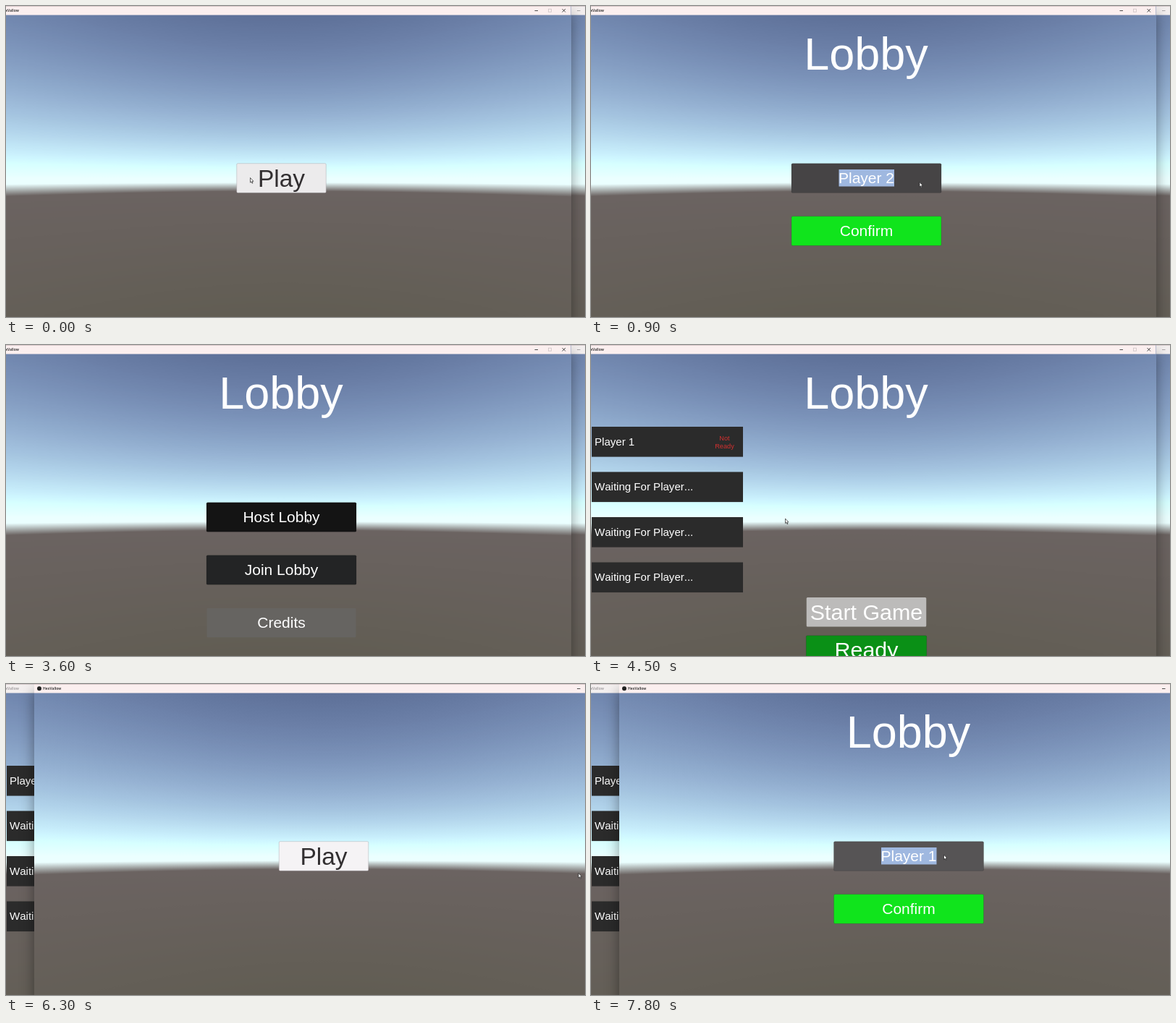
Animation of 800x430 px, one loop 8000 ms. Source, as an HTML page with a canvas:

```html
<!DOCTYPE html>
<html lang="en">
<head>
<meta charset="utf-8">
<style>
html, body { margin: 0; width: 100%; height: 100%; overflow: hidden; background: #615d53; }
canvas { display: block; }
</style>
</head>
<body>
<canvas id="stage" width="800" height="430"></canvas>
<script>
const ctx = document.getElementById('stage').getContext('2d');
const LOOP = 8000, STEP = 100, MOVE = 300;
const MID = 400, HORIZON = 238, FOCAL = 390, REACH = 225, BAR = 12.5;
const LEFT_WIN = -19.5, RIGHT_WIN = 39;
const SANS = '"Liberation Sans", Arial, sans-serif';
const GREEN = '#10e41c', DARK = '#232425', CLEAR = 'transparent';
const ARROW = new Path2D('M0 0V6.6L1.5 5.3L2.6 7.7L3.5 7.3L2.5 5L4.4 4.8Z');

// Pointer moves: start time and the place it goes to
const MOVES = [
  [-MOVE, 337.5, 237.5], [400, 454, 243.5], [2500, 428, 306],
  [3000, 415.5, 239.5], [4200, 268.5, 240], [4600, 346, 412],
  [5500, 791, 261.5], [6500, 455, 240], [7200, 487.5, 236]
];

const mix = (a, b, p) => a + (b - a) * p;
const clamp = p => Math.min(1, Math.max(0, p));

// Colour at a distance below (+) or above (-) the horizon
function skyColor(v) {
  const h = Math.max(0, -v);
  const air = [235 / (1 + h / 150), 280 / (1 + h / 150), 275 / (1 + h / 280)];
  const depth = clamp((v - 18) / 170);
  const ground = [mix(107, 97, depth), mix(99, 93, depth), mix(97, 83, depth)];
  const p = clamp((v - 6) / 12);
  return `rgb(${air.map((c, i) => mix(Math.min(255, c), ground[i], p))})`;
}

// Perspective stretches the sky vertically towards the sides
function makeSky() {
  const sky = document.createElement('canvas');
  sky.width = 800;
  sky.height = 463;
  const c = sky.getContext('2d');
  const fill = c.createLinearGradient(0, -REACH, 0, REACH);
  for (let v = -REACH; v <= REACH; v += 3)
    fill.addColorStop((v + REACH) / (2 * REACH), skyColor(v));
  c.fillStyle = fill;
  for (let x = 0; x < 800; x++) {
    c.setTransform(1, 0, 0, Math.hypot(1, (x - MID) / FOCAL), x, HORIZON);
    c.fillRect(0, -240, 1, 480);
  }
  return sky;
}
const sky = makeSky();

function text(str, x, y, size, color = '#fff', align = 'center') {
  ctx.font = `${size}px ${SANS}`;
  ctx.textAlign = align;
  ctx.fillStyle = color;
  ctx.fillText(str, x, y + size * 0.344);
}

function button(label, y, w, color, size = 21, ink = '#fff', edge = 'rgba(25,25,25,.25)') {
  ctx.beginPath();
  ctx.roundRect(MID - w / 2, y - 20.3, w, 40.6, 1.5);
  ctx.fillStyle = color;
  ctx.fill();
  ctx.strokeStyle = edge;
  ctx.lineWidth = 0.7;
  ctx.stroke();
  text(label, MID, y, size, ink);
}

const title = () => text('Lobby', MID - 0.5, 66.2, 63);

function playScreen(color) {
  button('Play', 238, 123.5, color, 33.5, '#322f31', 'rgba(150,145,148,.5)');
}

function nameScreen(name, selected, pressed, confirm) {
  title();
  button('', 238, 207, pressed ? '#464445' : '#565455');
  if (selected) {
    ctx.fillStyle = '#9fb8e0';
    ctx.fillRect(MID - 38, 226, 76.5, 23.5);
  }
  text(name, MID, 238, 21);
  button('Confirm', 311, 207, confirm);
}

function menuScreen(hover) {
  title();
  button('Host Lobby', 238, 207, hover ? '#141414' : DARK);
  button('Join Lobby', 311, 207, DARK);
  button('Credits', 384, 206, '#666461', 21, '#fff', CLEAR);
}

function roomScreen() {
  title();
  for (let i = 0; i < 4; i++) {
    const y = 133.8 + i * 62.5;
    ctx.fillStyle = '#2b2b2b';
    ctx.fillRect(20.5, y - 20.8, 209, 41.6);
    text(i ? 'Waiting For Player...' : 'Player 1', 24.5, y, 15.05, '#fff', 'left');
  }
  text('Not', 204, 128.8, 9.2, '#d2302f');
  text('Ready', 204, 139.4, 9.2, '#d2302f');
  button('Start Game', 369.3, 165.5, '#bcbbba', 30.4, '#fff', CLEAR);
  button('Ready', 422, 166.5, '#0a9016', 30.4);
}

function hostView(t) {
  if (t < 300) playScreen(t < 200 ? '#ecebec' : '#c8c6c8');
  else if (t < 3000) {
    const name = t < 1600 ? 'Player 2' : t < 2000 ? 'Player ' : 'Player 1';
    nameScreen(name, t >= 900 && t < 1300, t === 900, t < 2900 ? GREEN : '#0cb416');
  } else if (t < 3700) menuScreen(t >= 3400);
  else roomScreen();
}

function guestView(t) {
  if (t < 7200) playScreen(t < 6900 ? '#f5f3f5' : t < 7100 ? '#ecebec' : '#c8c6c8');
  else nameScreen('Player 1', t >= 7700, t === 7700, GREEN);
}

function line(...points) {
  ctx.beginPath();
  for (const [x, y] of points) ctx.lineTo(x, y);
  ctx.stroke();
}

function titleBar(active) {
  const ink = active ? '#222' : '#9a9698';
  ctx.fillStyle = active ? '#fbefef' : '#f3efef';
  ctx.fillRect(0, 0, 800, BAR);
  ctx.fillStyle = 'rgba(150,125,128,.35)';
  ctx.fillRect(0, 0, 800, 1);
  ctx.fillStyle = ctx.strokeStyle = ink;
  ctx.beginPath();
  ctx.arc(7, 6.3, 3, 0, 7);
  ctx.fill();
  ctx.font = '600 5px "Open Sans", sans-serif';
  ctx.textAlign = 'left';
  ctx.fillText('HexVallow', 12, 8.2);
  ctx.lineWidth = 0.8;
  line([750, 6.5], [754.5, 6.5]);
  line([788, 4], [792.5, 8.5]);
  line([792.5, 4], [788, 8.5]);
  ctx.strokeStyle = '#cdc4c5';
  ctx.strokeRect(769, 4.2, 4, 4);
}

function appWindow(x, view, t, active) {
  ctx.save();
  ctx.translate(x, 0);
  if (active) {
    ctx.shadowColor = 'rgba(0,0,0,.4)';
    ctx.shadowBlur = 18;
    ctx.shadowOffsetY = 10;
    ctx.fillRect(0, 0, 800, 470);
    ctx.shadowColor = CLEAR;
  }
  ctx.drawImage(sky, 0, 0);
  view(t);
  titleBar(active);
  ctx.restore();
}

function pointer(t) {
  let x = 0, y = 0;
  for (const [at, toX, toY] of MOVES) {
    const p = clamp((t - at) / MOVE), e = p * p * (3 - 2 * p);
    x = mix(x, toX, e);
    y = mix(y, toY, e);
  }
  ctx.save();
  ctx.translate(x, y);
  ctx.fillStyle = '#fff';
  ctx.fill(ARROW);
  ctx.strokeStyle = '#222';
  ctx.lineWidth = 0.7;
  ctx.stroke(ARROW);
  ctx.restore();
}

function draw(now) {
  const t = Math.floor(now % LOOP / STEP) * STEP;
  const guestFront = t >= 6000;
  const host = () => appWindow(LEFT_WIN, hostView, t, !guestFront);
  const guest = () => appWindow(RIGHT_WIN, guestView, t, guestFront);
  ctx.fontKerning = 'none';
  for (const show of guestFront ? [host, guest] : [guest, host]) show();
  pointer(t);
}

const start = performance.now();
function tick() {
  draw(performance.now() - start);
  requestAnimationFrame(tick);
}
tick();
</script>
</body>
</html>
```
